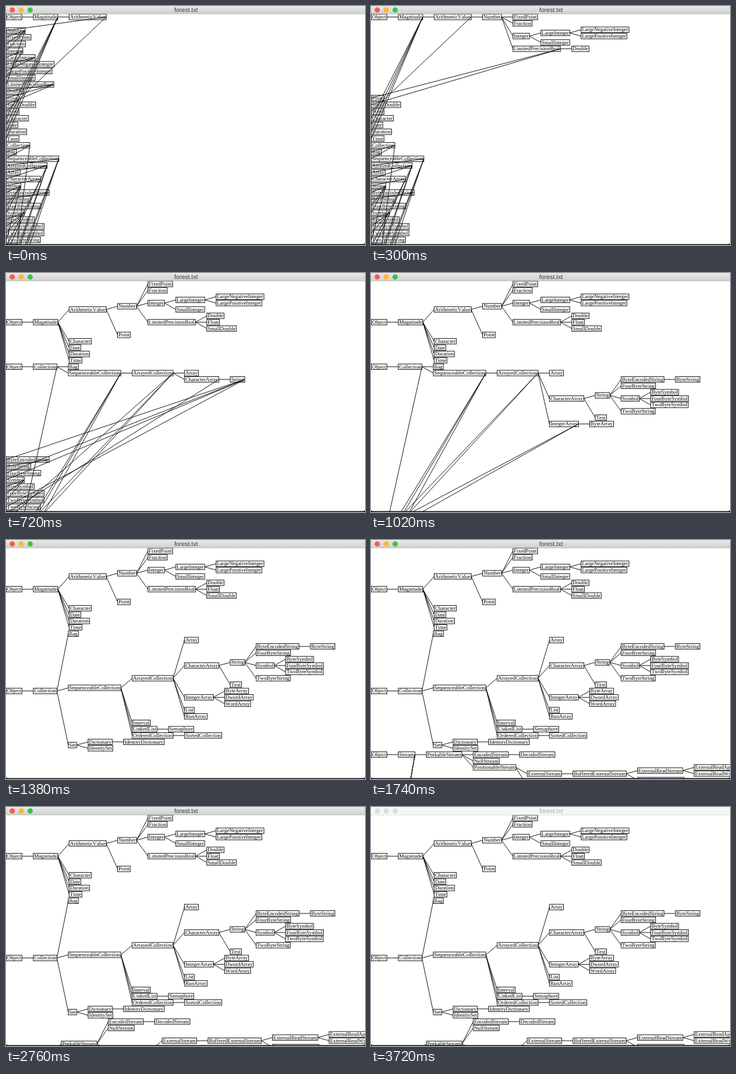
These frames come from a looping animation (600 by 400 pixels, 3780 ms). An HTML page:

```html
<!DOCTYPE html>
<html lang="en">
<head>
<meta charset="utf-8">
<title>forest.txt</title>
<style>
html, body { margin: 0; width: 100%; height: 100%; overflow: hidden; background: #fffffe; }
svg { display: block; width: 600px; height: 400px; }
.node rect { fill: #fff; stroke: #0c0c0c; stroke-width: .95; }
.node text { font: 8.8px "Liberation Serif", serif; fill: #000; text-rendering: geometricPrecision; font-kerning: none; }
#edges { fill: none; stroke: #0c0c0c; stroke-width: .95; }
#title { font: 10.3px "Liberation Sans", sans-serif; fill: #3a3a3a; text-anchor: middle; text-rendering: geometricPrecision; }
#bar { fill: url(#shade); }
#rule { stroke: #b0b0b0; }
.idle #bar { fill: #f6f6f6; }
.idle #title { fill: #a8a8a8; }
.idle #rule { stroke: #d8d8d8; }
.idle circle { fill: #dcdcdc; }
</style>
</head>
<body>
<svg id="stage" viewBox="0 0 600 400">
  <defs>
    <linearGradient id="shade" x2="0" y2="1">
      <stop offset="0" stop-color="#e8e8e8"/>
      <stop offset="1" stop-color="#d0d0d0"/>
    </linearGradient>
  </defs>
  <g id="nodes"></g>
  <path id="edges"/>
  <rect id="bar" width="600" height="13"/>
  <path id="rule" d="M0 13.2H600" stroke-width=".8"/>
  <circle cx="10.5" cy="6.6" r="4.4" fill="#fb5a4c"/>
  <circle cx="25.4" cy="6.6" r="4.4" fill="#fdb82f"/>
  <circle cx="40.4" cy="6.6" r="4.4" fill="#36c641"/>
  <text id="title" x="301" y="10">forest.txt</text>
  <path d="M0 395.5q0 3 3 3H597q3 0 3-3V400H0Z" fill="#141414"/>
</svg>
<script>
const OUTLINE = `
Object
 Magnitude
  ArithmeticValue
   Number
    FixedPoint
    Fraction
    Integer
     LargeInteger
      LargeNegativeInteger
      LargePositiveInteger
     SmallInteger
    LimitedPrecisionReal
     Double
     Float
     SmallDouble
   Point
  Character
  Date
  Duration
  Time
Object
 Collection
  Bag
  SequenceableCollection
   ArrayedCollection
    Array
    CharacterArray
     String
      ByteEncodedString
       ByteString
      FourByteString
      Symbol
       ByteSymbol
       FourByteSymbol
       TwoByteSymbol
      TwoByteString
     Text
    IntegerArray
     ByteArray
     DwordArray
     WordArray
    List
    RunArray
   Interval
   LinkedList
    Semaphore
   OrderedCollection
    SortedCollection
  Set
   Dictionary
    IdentityDictionary
   IdentitySet
Object
 Stream
  PeekableStream
   EncodedStream
    DecodedStream
   NullStream
   PositionableStream
    ExternalStream
     BufferedExternalStream
      ExternalReadStream
       ExternalReadAppendStream
       ExternalReadWriteStream
      ExternalWriteStream
    InternalStream
     ReadStream
     WriteStream
      ReadWriteStream
      TextStream
  Random
  FastRandom
  MinimumStandardRandom`;

const LOOP = 3780, TICK = 60, IDLE_AT = 3060;
const TOP = 18.4, LEAF = 10.65, ROW = 11.3, GAP = 19, PAD = 1.4, BOX = 9.3;
const SVG = 'http://www.w3.org/2000/svg';
const $ = id => document.getElementById(id);

function make(tag, parent, attrs = {}) {
  const el = parent.appendChild(document.createElementNS(SVG, tag));
  for (const key in attrs) el.setAttribute(key, attrs[key]);
  return el;
}

const pen = document.createElement('canvas').getContext('2d');
pen.font = '88px "Liberation Serif", serif';
pen.fontKerning = 'none';

function parse(outline) {
  const path = [], nodes = [];
  let row = 0;
  outline.trim().split('\n').forEach((line, index) => {
    const name = line.trim(), depth = line.length - name.length;
    const parent = depth ? path[depth - 1] : null;
    const width = pen.measureText(name).width / 10 + 2 * PAD;
    const node = { name, parent, index, width, kids: [], x: parent ? parent.x + parent.width + GAP : .4 };
    if (parent) {
      parent.kids.push(node);
      node.listY = TOP + ROW * row++;
    }
    path[depth] = node;
    nodes.push(node);
  });
  return nodes;
}

// Leaves take consecutive lines; a parent spans those of its subtree.
let leaves = 0;
function measure(node) {
  node.first = leaves;
  node.kids.forEach(measure);
  if (!node.kids.length) leaves++;
  node.last = leaves - 1;
  node.end = node.kids.length ? node.kids[node.kids.length - 1].end : node.index;
}

const nodes = parse(OUTLINE);
nodes.filter(n => !n.parent).forEach(measure);

for (const n of nodes) {
  n.el = make('g', $('nodes'), { class: 'node' });
  make('rect', n.el, { y: -BOX / 2, width: n.width, height: BOX });
  make('text', n.el, { x: PAD, y: 2.7 }).textContent = n.name;
}

// Waiting nodes sit in the list; a finished subtree centres its parent.
function place(n, step) {
  const placed = step >= n.index;
  const line = step >= n.end ? (n.first + n.last) / 2 : n.first;
  n.shown = n.parent || placed;
  n.px = placed ? n.x : .4;
  n.py = placed ? TOP + LEAF * line : n.listY || 0;
  n.el.style.display = n.shown ? '' : 'none';
  n.el.setAttribute('transform', `translate(${n.px} ${n.py})`);
}

const edge = n => `M${n.parent.px + n.parent.width} ${n.parent.py}L${n.px} ${n.py}`;

let drawn = -1;
function frame() {
  const tick = Math.floor(performance.now() % LOOP / TICK);
  if (tick !== drawn) {
    drawn = tick;
    const step = Math.max(2, Math.floor(1.8 + tick * 2.18));
    nodes.forEach(n => place(n, step));
    $('edges').setAttribute('d', nodes.filter(n => n.parent && n.parent.shown).map(edge).join(''));
    $('stage').classList.toggle('idle', tick * TICK >= IDLE_AT);
  }
  requestAnimationFrame(frame);
}
frame();
</script>
</body>
</html>
```
